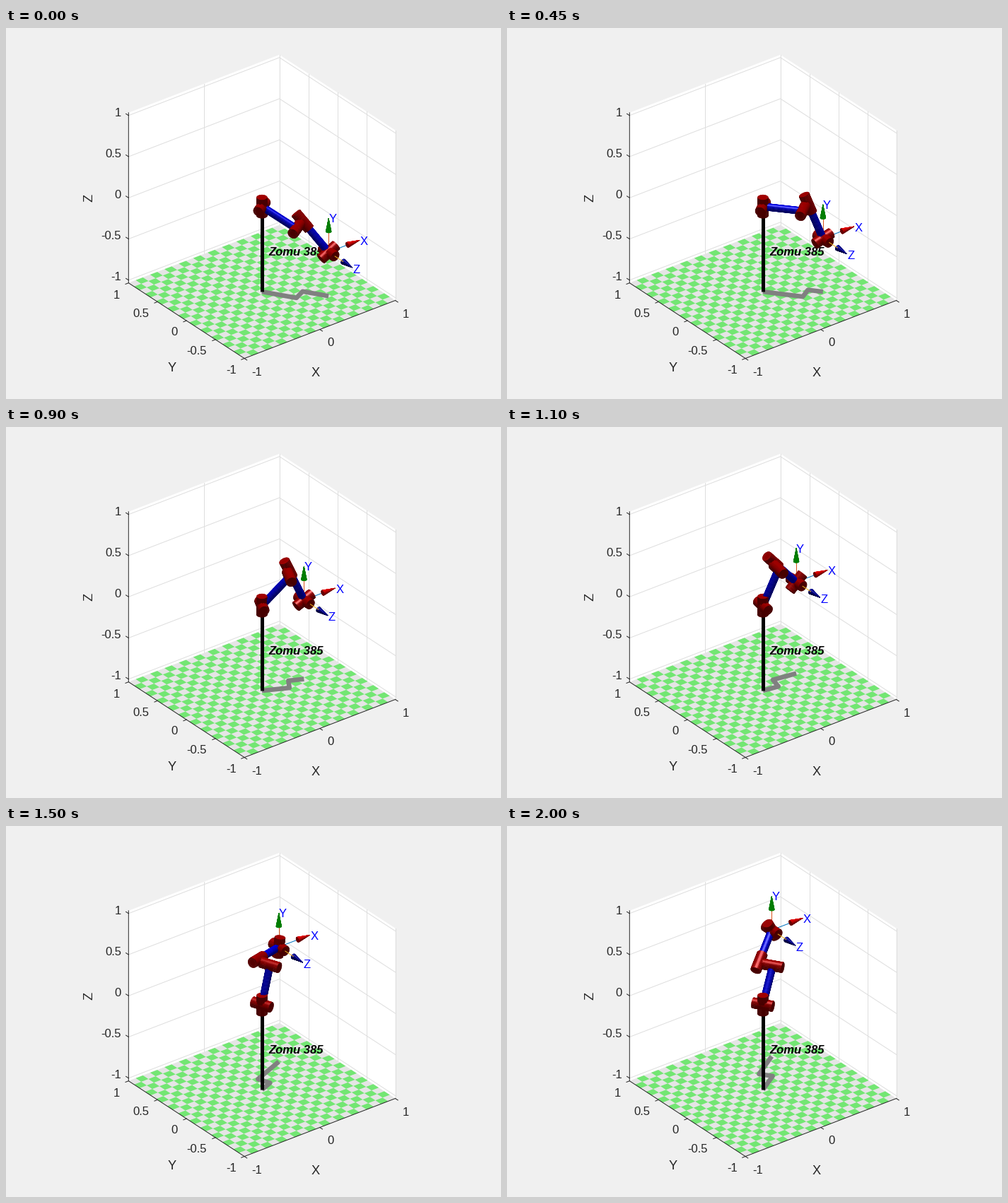
A matplotlib script that plays this animation: 700x525 px, repeating every 2050 ms.

```python
import numpy as np
import matplotlib.pyplot as plt
from matplotlib.animation import FuncAnimation
from matplotlib.collections import PolyCollection

W, H, DPI, FRAMES = 700, 525, 100, 41
PT = 72 / DPI
INK = (0.15, 0.15, 0.15)
FONT = 16.67

# Orthographic camera, azimuth -37.5, elevation 30
BASIS = np.array([[106.7, -41.0], [-81.9, -53.4], [0, -116.5]])
ORIGIN = np.array([361.9, 252.7])
VIEW = np.array([-0.527, -0.687, 0.5])
ZMAX = 1.034

# Arm dimensions
A2, A3, D3, D4 = 0.4318, 0.0203, 0.15005, 0.4318
LINK_R, JOINT_R, JOINT_L = 0.037, 0.0555, 0.110
RED, BLUE = (0.7, 0, 0), (0, 0, 0.95)
LABEL_AT, CONE_TIP, CONE_AT, CONE_R = 0.42, 0.41, 0.25, 0.029

plt.rcParams["font.family"] = "Liberation Sans"
fig = plt.figure(figsize=(W / DPI, H / DPI), dpi=DPI, facecolor="#f0f0f0")
ax = fig.add_axes([0, 0, 1, 1])
ax.set_xlim(0, W)
ax.set_ylim(H, 0)
ax.axis("off")


def proj(p):
    return ORIGIN + np.asarray(p, float) @ BASIS


def unit(v):
    return v / np.linalg.norm(v)


def line(points, color, width=1.0, z=2, **kw):
    return ax.plot(*proj(points).T, color=color, lw=width * PT, zorder=z, **kw)[0]


def quad(corners, color, z=1):
    ax.add_patch(plt.Polygon(proj(corners), fc=color, ec="none", zorder=z))


def label(x, y, s, size=FONT, color=INK, ha="center", z=4, **kw):
    """Text whose capitals are centred on y."""
    return ax.text(x, y + 0.36 * size, s, fontsize=size * PT, color=color,
                   ha=ha, va="baseline", zorder=z, **kw)


def draw_box():
    t, grid = ZMAX, "#dedede"
    quad([(-1, 1, -t), (1, 1, -t), (1, 1, t), (-1, 1, t)], "white")
    quad([(1, 1, -t), (1, -1, -t), (1, -1, t), (1, 1, t)], "white")
    for z in np.linspace(-1, 1, 5):
        line([(-1, 1, z), (1, 1, z), (1, -1, z)], grid)
    line([(0, 1, -t), (0, 1, t)], grid)
    for y in np.linspace(-1, 1, 5):
        line([(1, y, -t), (1, y, t)], grid)

    quad([(-1, -1, -t), (1, -1, -t), (1, 1, -t), (-1, 1, -t)], "#e5e5e5", 3)
    n = 21
    e = np.linspace(-1, 1, n + 1)
    tiles = [proj([(e[i], e[j], -t), (e[i + 1], e[j], -t),
                   (e[i + 1], e[j + 1], -t), (e[i], e[j + 1], -t)])
             for i in range(n) for j in range(n) if (i + j) % 2]
    ax.add_collection(PolyCollection(tiles, facecolors="#73e673",
                                     edgecolors="none", zorder=3))

    line([(-1, 1, t), (-1, 1, -t), (-1, -1, -t), (1, -1, -t)], INK, z=3.5)
    d = 0.045
    for x in (-1, 0, 1):
        line([(x, -1, -t), (x, -1 - d, -t)], INK, z=3.5)
    for v in np.linspace(-1, 1, 5):
        line([(-1, v, -t), (-1 - d * 0.9, v, -t)], INK, z=3.5)
        line([(-1, 1, v), (-1, 1 + d, v)], INK, z=3.5)


def draw_labels():
    for x, y, s in [(355, 485.7, "-1"), (459, 444.3, "0"), (565, 403.7, "1"),
                    (156.7, 376.7, "1"), (191, 403.3, "0.5"), (238, 429.3, "0"),
                    (270, 456.3, "-0.5"), (318.3, 483, "-1")]:
        label(x, y, s)
    for k, s in enumerate(["1", "0.5", "0", "-0.5", "-1"]):
        label(163, 119 + 58.1 * k, s, ha="right")
    label(437.5, 486.5, "X", 18.3)
    label(234.5, 479.5, "Y", 18.3)
    ax.text(118, 240.5, "Z", fontsize=18.3 * PT, color=INK, rotation=90,
            ha="center", va="center")
    label(371.2, 316, "Zomu 385", color="black", ha="left", z=7,
          weight="bold", style="italic")


def shade(normals, color):
    """Ambient, diffuse and specular terms for a light straight above."""
    nz = np.clip(normals[:, 2], 0, None)
    refl = 2 * nz[:, None] * normals - [0, 0, 1]
    spec = np.where(nz > 0, np.clip(refl @ VIEW, 0, None) ** 10, 0)
    lit = (0.4 + 0.5 * nz)[:, None] * np.array(color) + 0.55 * spec[:, None]
    return np.clip(lit, 0, 1)


def tube(p, q, r0, r1, color, n=32, m=10):
    """Visible facets of a capped cylinder or cone as (quads, colours)."""
    axis = q - p
    length = np.linalg.norm(axis)
    w = axis / length
    u = unit(np.cross(w, [0, 0, 1] if abs(w[2]) < 0.9 else [1, 0, 0]))
    v = np.cross(w, u)

    def radial(a):
        return np.cos(a)[:, None] * u + np.sin(a)[:, None] * v

    a = np.linspace(0, 2 * np.pi, n + 1)
    ring = radial(a)
    s = np.linspace(0, 1, m + 1)
    pts = (p + s[:, None, None] * axis
           + (r0 + (r1 - r0) * s)[:, None, None] * ring)
    side = np.stack([pts[:-1, :-1], pts[:-1, 1:], pts[1:, 1:], pts[1:, :-1]],
                    axis=2).reshape(-1, 4, 3)
    out = radial((a[:-1] + a[1:]) / 2) + w * (r0 - r1) / length
    out /= np.linalg.norm(out, axis=1)[:, None]
    quads, normals = [side], [np.tile(out, (m, 1))]
    for c, rim, nrm in ((p, pts[0], -w), (q, pts[-1], w)):
        mid = np.tile(c, (n, 1))
        quads.append(np.stack([mid, rim[:-1], rim[1:], mid], axis=1))
        normals.append(np.tile(nrm, (n, 1)))
    quads, normals = np.concatenate(quads), np.concatenate(normals)
    seen = normals @ VIEW > 0
    return quads[seen], shade(normals[seen], color)


def joint(c, axis):
    return tube(c - axis * JOINT_L, c + axis * JOINT_L, JOINT_R, JOINT_R, RED)


def link(p, q):
    return tube(p, q, LINK_R, LINK_R, BLUE)


def blend(t):
    """Linear travel with parabolic ends, each a third of the time."""
    if t < 1 / 3:
        return 2.25 * t * t
    if t > 2 / 3:
        return 1 - 2.25 * (1 - t) ** 2
    return 0.25 + 1.5 * (t - 1 / 3)


def solve(p):
    """Elbow, forearm root, shoulder axis and forearm direction (left, elbow up)."""
    x, y, z = p
    q1 = np.arctan2(y, x) + np.pi - np.arcsin(D3 / np.hypot(x, y))
    fwd = np.array([np.cos(q1), np.sin(q1), 0])
    side = np.array([np.sin(q1), -np.cos(q1), 0])
    up = np.array([0, 0, 1.0])
    reach, fore = np.hypot(p @ fwd, z), np.hypot(A3, D4)
    bend = np.arccos((A2**2 + reach**2 - fore**2) / (2 * A2 * reach))
    q2 = np.arctan2(z, p @ fwd) - bend
    elbow = A2 * (np.cos(q2) * fwd + np.sin(q2) * up)
    rest = p - elbow
    q23 = np.arctan2(rest[2], rest @ fwd) - np.arctan2(D4, A3)
    root = elbow + D3 * side + A3 * (np.cos(q23) * fwd + np.sin(q23) * up)
    return elbow, root, side, unit(p - root)


draw_box()
draw_labels()
shadow = line(np.zeros((4, 3)), "#808080", 6.5, 5, solid_capstyle="butt",
              solid_joinstyle="round")
line([(0, 0, -ZMAX), (0, 0, 0)], "black", 5, 6, solid_capstyle="butt")
body = PolyCollection([], linewidths=0.4, zorder=9)
ax.add_collection(body)

# direction, cone colour, shaft colour, shaft start, shaft layer
TOOL = [(np.array([1.0, 0, 0]), (1, 0, 0), "#0072bd", 0, 8),
        (np.array([0, 0, 1.0]), (0, 1, 0), "#d95319", 0, 8),
        (np.array([0, -1.0, 0]), (0, 0, 0.6), "#edb120", JOINT_L, 10)]
shafts = [line(np.zeros((2, 3)), c, 1, z) for _, _, c, _, z in TOOL]
names = [label(0, 0, s, color="blue", ha="left", z=11) for s in "XYZ"]


def draw(i):
    y = blend(i / (FRAMES - 1)) - 0.5
    p = np.array([0.5, y, y])
    base, up = np.zeros(3), np.array([0, 0, 1.0])
    elbow, root, side, fore = solve(p)
    tool_z = TOOL[2][0]

    parts = [joint(base, up), joint(base, side), link(base, elbow),
             joint(elbow, side), joint(root, fore), link(root, p),
             joint(p, unit(np.cross(fore, tool_z))), joint(p, tool_z)]
    for (d, color, _, start, _), shaft, name in zip(TOOL, shafts, names):
        neck = p + d * CONE_AT
        parts.append(tube(neck, p + d * CONE_TIP, CONE_R, 0, color))
        shaft.set_data(*proj([p + d * start, neck]).T)
        tx, ty = proj(p + d * LABEL_AT)
        name.set_position((tx, ty + 1 + 0.36 * FONT))

    quads = np.concatenate([q for q, _ in parts])
    colors = np.concatenate([c for _, c in parts])
    order = np.argsort(quads.mean(axis=1) @ VIEW)
    body.set_verts(proj(quads[order]))
    body.set_facecolor(colors[order])
    body.set_edgecolor(colors[order])

    trail = np.array([base, elbow, root, p])
    trail[:, 2] = -ZMAX
    shadow.set_data(*proj(trail).T)
    return [body, shadow, *shafts, *names]


anim = FuncAnimation(fig, draw, frames=FRAMES, interval=50, repeat=True)
plt.show()
```
